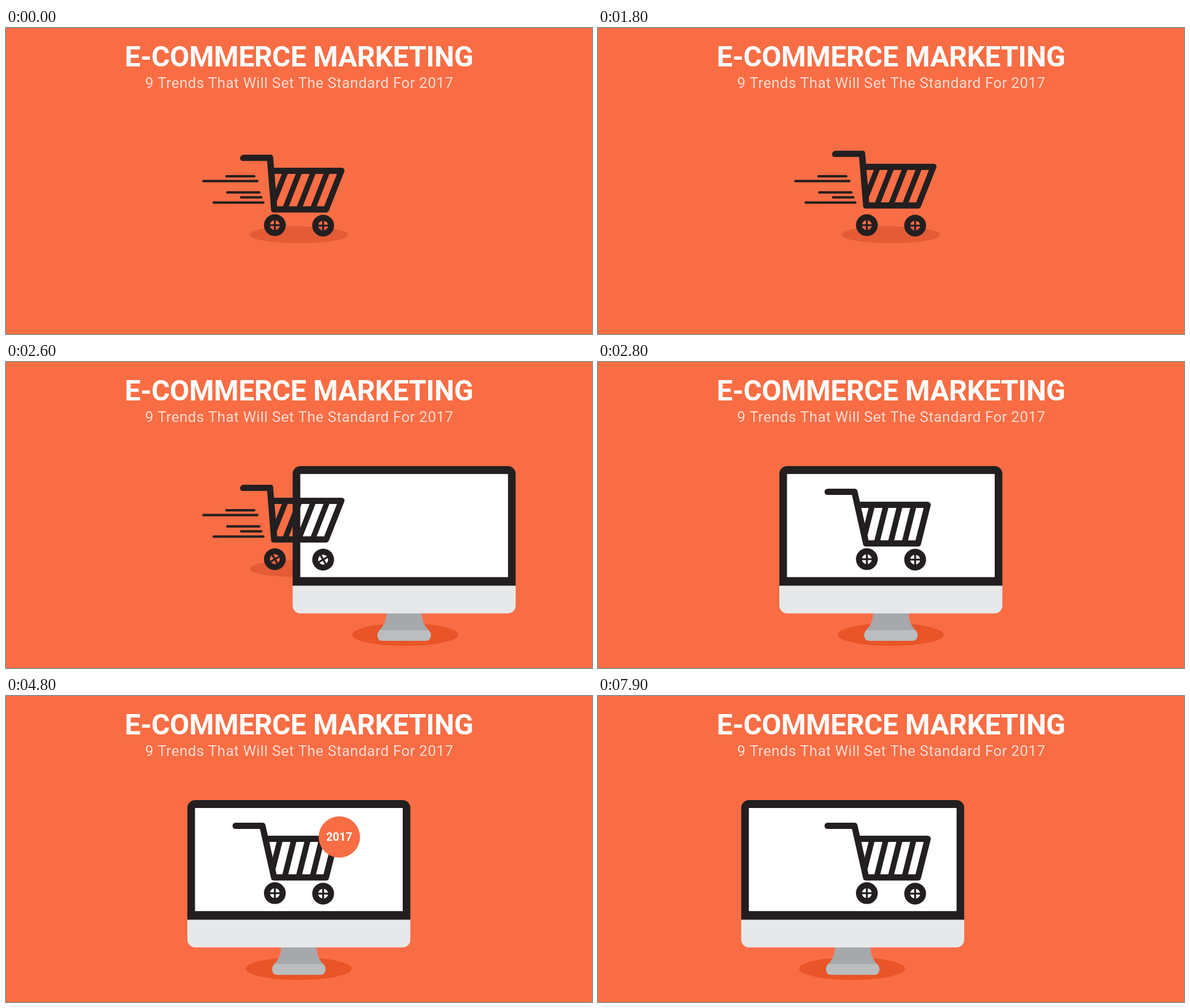
An HTML page with a canvas that plays this animation: 1034 px wide and 541 px high, repeating every 8000 ms.

```html
<!DOCTYPE html>
<html lang="en">
<head>
<meta charset="utf-8">
<title>E-commerce marketing</title>
<style>
  html, body { margin: 0; width: 100%; height: 100%; overflow: hidden; background: #f96d44; }
  canvas { display: block; }
</style>
</head>
<body>
<canvas id="stage" width="1034" height="541"></canvas>
<script>
const ctx = document.getElementById('stage').getContext('2d');
const LOOP = 8000, STEP = 100;
const ORANGE = '#f96d44', DARK = '#231f20';

const clamp = (v, lo, hi) => Math.min(hi, Math.max(lo, v));

function ellipse(x, y, rx, ry, color) {
  ctx.fillStyle = color;
  ctx.beginPath();
  ctx.ellipse(x, y, rx, ry, 0, 0, Math.PI * 2);
  ctx.fill();
}

function rounded(x, y, w, h, radii, color) {
  ctx.fillStyle = color;
  ctx.beginPath();
  ctx.roundRect(x, y, w, h, radii);
  ctx.fill();
}

function line(width, ...points) {
  ctx.strokeStyle = DARK;
  ctx.lineWidth = width;
  ctx.lineCap = ctx.lineJoin = 'round';
  ctx.beginPath();
  points.forEach(([x, y]) => ctx.lineTo(x, y));
  ctx.stroke();
}

function text(str, x, y, font, color, spacing) {
  ctx.font = font + ' Roboto, sans-serif';
  ctx.letterSpacing = spacing + 'px';
  ctx.textAlign = 'center';
  ctx.fillStyle = color;
  ctx.fillText(str, x, y);
}

function heading() {
  text('E-COMMERCE MARKETING', 517, 68, 'bold 50px', '#fff', -0.3);
  text('9 Trends That Will Set The Standard For 2017', 517.5, 106, '26px',
    'rgba(255,255,255,.75)', 0.5);
}

const stand = new Path2D('M485.5 444C485.5 460 479 468 473.5 474C470.5 477 469.5 480 469.5 483' +
  'Q469.5 493 479.5 493H554Q564 493 564 483C564 480 563 477 560 474C554 468 548 460 548 444Z');

function monitor(dx) {
  ellipse(516.5 + dx * 1.012, 482, 93.5, 20, '#e95428');
  ctx.save();
  ctx.translate(dx, 0);
  ctx.fillStyle = '#bbbdbf';
  ctx.fill(stand);
  ctx.save();
  ctx.clip(stand);
  ctx.fillStyle = '#a6a8ab';
  ctx.fillRect(460, 440, 110, 34);
  ctx.restore();
  rounded(320, 184, 393.5, 212, [14, 14, 0, 0], DARK);
  rounded(320, 395.5, 393.5, 49, [0, 0, 14, 14], '#e7e8ea');
  ctx.fillStyle = '#fff';
  ctx.fillRect(333.5, 198, 366.5, 182.3);
  ctx.restore();
}

function wheel(x, y, angle) {
  ctx.save();
  ctx.translate(x, y);
  ctx.rotate(angle);
  ctx.strokeStyle = DARK;
  ctx.lineWidth = 10.5;
  ctx.beginPath();
  ctx.arc(0, 0, 14, 0, Math.PI * 2);
  ctx.stroke();
  line(3.4, [-9, 0], [9, 0]);
  line(3.4, [0, -9], [0, 9]);
  ctx.restore();
}

// lean shears the body around its bottom rail
function cartBody(lift, lean) {
  const base = 323;
  ctx.save();
  ctx.transform(1, 0, -lean, 1, lean * base, -lift);
  line(11, [405.2, 229.5], [452.5, 229.5], [473, 320.8], [564.5, 320.8], [581.7, 252.5], [459, 252.5]);
  line(10, [484, 252.5], [471, 304]);
  for (let i = 1; i < 4; i++) {
    const x = 484 + i * 24.5;
    line(10, [x, 252.5], [x - 17, 320.8]);
  }
  ctx.restore();
}

function speedLines(dx) {
  [[389, 438, 262.2], [348.3, 443.5, 270.7], [390.5, 447, 290.7], [414.8, 450.5, 299.4], [366.5, 454, 308.7]]
    .forEach(([a, b, y]) => line(4.2, [a + dx, y], [b + dx, y]));
}

function badge(k) {
  if (k <= 0) return;
  const full = k > 6;
  ellipse(588.2, 249.2, full ? 36.5 : 40.6 * k / 6, full ? 36.5 : 40.6 * k / 6, ORANGE);
  if (full) text('2017', 588, 256, 'bold 20px', '#fff', 0);
}

function monitorShift(t) {
  const steps = t < 5000 ? (2800 - t) / STEP : (t - 7800) / STEP;
  const side = t < 5000 ? 1 : -1;
  return side * 67.3 * Math.pow(Math.max(0, steps), 1.465);
}

function draw(time) {
  const t = Math.floor(time / STEP) * STEP;
  const n = t / STEP;
  const rolling = t < 2800;

  ctx.fillStyle = ORANGE;
  ctx.fillRect(0, 0, 1034, 541);
  heading();

  if (rolling) ellipse(516.5, 365.5, 87, 15, '#e55b35');
  const dx = monitorShift(t);
  if (dx < 720) monitor(dx);

  if (rolling) speedLines(n % 2 ? -25 : 0);
  const lift = rolling ? 3.5 * (1 - Math.cos(n * Math.PI / 2)) : 0;
  cartBody(lift, 0.143 * clamp((2800 - t) / 200, 0, 1));
  const angle = rolling ? n * Math.PI / 6 : 0;
  wheel(474.4, 348.6, angle);
  wheel(559.6, 349.4, angle);

  badge(Math.min((t - 4100) / STEP, (7900 - t) / STEP));
}

const start = performance.now();
function tick() {
  draw((performance.now() - start) % LOOP);
  requestAnimationFrame(tick);
}
tick();
</script>
</body>
</html>
```
